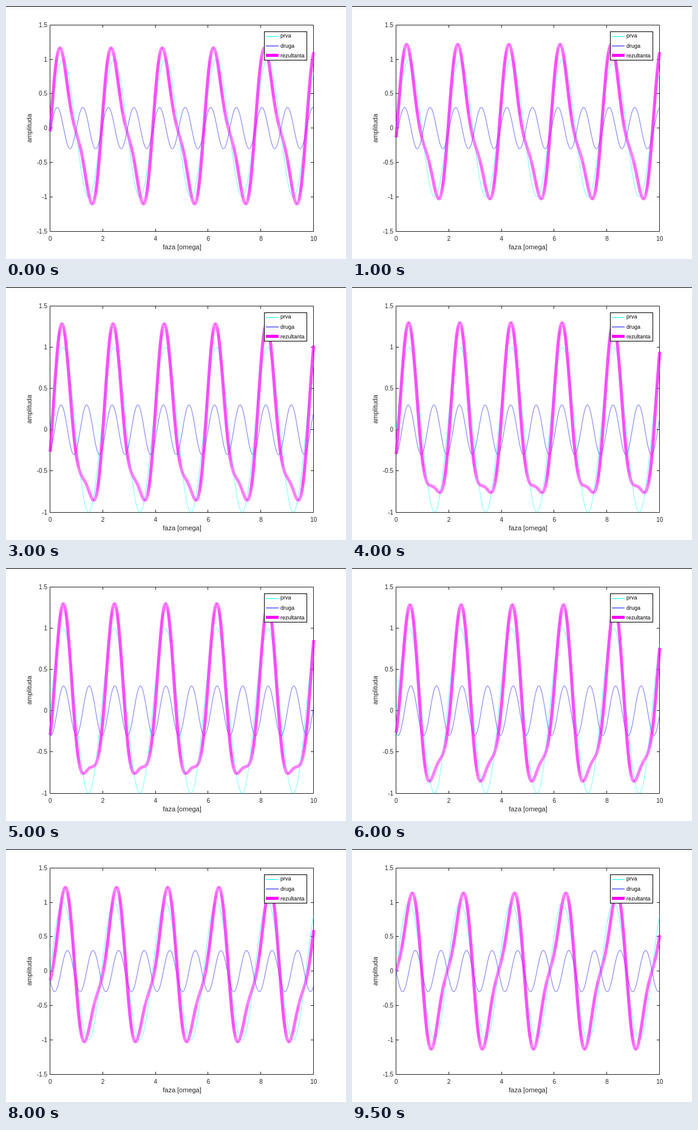
Write an HTML page that moves like this. It is 560 px wide and 418 px high and loops after 10000 ms.

```html
<!DOCTYPE html>
<html lang="sl">
<head>
<meta charset="utf-8">
<title>amplituda / faza</title>
<style>
  html, body { margin: 0; width: 100%; height: 100%; overflow: hidden; background: #fff; }
  svg { display: block; width: 560px; height: 418px; }
  text { font: 10px "Liberation Sans", Arial, sans-serif; fill: #262626; }
  .label { font-size: 11px; text-anchor: middle; }
  .legend text { font-size: 9px; fill: #000; }
  path { fill: none; }
  .axis { stroke: #262626; stroke-width: 1; }
</style>
</head>
<body>
<svg id="stage" viewBox="0 0 560 418"></svg>
<script>
const STEP = 500, COUNT = 20;
const LEFT = 72.8, RIGHT = 506.8, TOP = 31.4, BOTTOM = 372;
const OMEGA = 2 * Math.PI * 0.515;
const SAMPLES = 1000;

const stage = document.getElementById('stage');

function add(name, attrs, parent = stage, text = '') {
  const el = document.createElementNS('http://www.w3.org/2000/svg', name);
  for (const key in attrs) el.setAttribute(key, attrs[key]);
  el.textContent = text;
  parent.append(el);
  return el;
}

const snap = v => Math.floor(v) + 0.5;
const toX = x => LEFT + x / 10 * (RIGHT - LEFT);
const toY = (y, low) => TOP + (1.5 - y) / (1.5 - low) * (BOTTOM - TOP);

// Fixed parts
add('rect', { width: 560, height: 418, fill: '#fff' });
add('rect', { width: 560, height: 1, fill: '#000' });
add('path', { class: 'axis', d: 'M72.5 31.5H506.5V372.5H72.5Z' });

let xTicks = '';
for (let v = 0; v <= 10; v += 2) {
  const x = snap(toX(v) - 0.3);
  xTicks += `M${x} 372v-4M${x} 32v4`;
  add('text', { x: toX(v), y: 388, 'text-anchor': 'middle' }, stage, v);
}
add('path', { class: 'axis', d: xTicks });
add('text', { class: 'label', x: 290, y: 402 }, stage, 'faza [omega]');
add('text', { class: 'label', transform: 'translate(42 202) rotate(-90)' }, stage, 'amplituda');

// Parts that follow the phase
const yAxis = add('g', {});
const curve = (stroke, width, opacity) =>
  add('path', { stroke, 'stroke-width': width, 'stroke-opacity': opacity, 'stroke-linejoin': 'round' });
const first = curve('#0ff', 1.1, 0.5);
const second = curve('#00f', 1.1, 0.5);
const sum = curve('#f0f', 5, 0.5);
// The translucent stroke grows denser where it is steep
const dense = [4, 5.5, 7].map(slope => ({ slope, path: curve('#f0f', 5, 0.15) }));
const tips = curve('#80a', 1.5, 0.6);

const legend = add('g', { class: 'legend' });
add('rect', { x: 425.5, y: 42.5, width: 70, height: 47, fill: '#fff', stroke: '#000' }, legend);
[['prva', '#0ff', 1, 50.5, 52], ['druga', '#00f', 1, 66, 69], ['rezultanta', '#f0f', 5, 81.5, 85]]
  .forEach(([name, stroke, width, y, base]) => {
    add('path', { d: `M428 ${y}H449`, stroke, 'stroke-width': width }, legend);
    add('text', { x: 452, y: base }, legend, name);
  });

function drawYAxis(low) {
  yAxis.replaceChildren();
  let d = '';
  for (let v = low; v <= 1.5; v += 0.5) {
    const y = toY(v, low), line = v === low ? 372.5 : snap(y);
    d += `M73 ${line}h4M506 ${line}h-4`;
    add('text', { x: 68, y: y + 3.5, 'text-anchor': 'end' }, yAxis, v);
  }
  add('path', { class: 'axis', d }, yAxis);
}

function points(f, low) {
  return Array.from({ length: SAMPLES + 1 }, (_, i) => {
    const x = i * 10 / SAMPLES;
    return [toX(x), toY(f(x), low)];
  });
}

const at = p => p[0].toFixed(2) + ' ' + p[1].toFixed(2);
const trace = list => 'M' + list.map(at).join('L');

function steepParts(list, limit) {
  let d = '', open = false;
  for (let i = 1; i < list.length; i++) {
    const a = list[i - 1], b = list[i];
    const steep = Math.abs((b[1] - a[1]) / (b[0] - a[0])) > limit;
    if (steep) d += (open ? '' : 'M' + at(a)) + 'L' + at(b);
    open = steep;
  }
  return d;
}

function extremes(list, middle) {
  let d = '';
  for (let i = 1; i < list.length - 1; i++) {
    const [x, y] = list[i];
    if ((y - list[i - 1][1]) * (list[i + 1][1] - y) < 0) {
      d += `M${x - 0.8} ${y + (y < middle ? 0.8 : -0.8)}h1.6`;
    }
  }
  return d;
}

function draw(index) {
  const k = index + 1, phase = k * Math.PI / COUNT;
  const low = k < 4 || k > 16 ? -1.5 : -1;
  const f = x => Math.sin(OMEGA * x);
  const g = x => 0.3 * Math.sin(2 * OMEGA * x - phase);
  const total = points(x => f(x) + g(x), low);

  drawYAxis(low);
  first.setAttribute('d', trace(points(f, low)));
  second.setAttribute('d', trace(points(g, low)));
  sum.setAttribute('d', trace(total));
  dense.forEach(({ slope, path }) => path.setAttribute('d', steepParts(total, slope)));
  tips.setAttribute('d', extremes(total, toY(0, low)));
}

const start = performance.now();
let shown = 0;
draw(0);

function tick() {
  const index = Math.floor((performance.now() - start) / STEP) % COUNT;
  if (index !== shown) draw(shown = index);
  requestAnimationFrame(tick);
}
requestAnimationFrame(tick);
</script>
</body>
</html>
```
